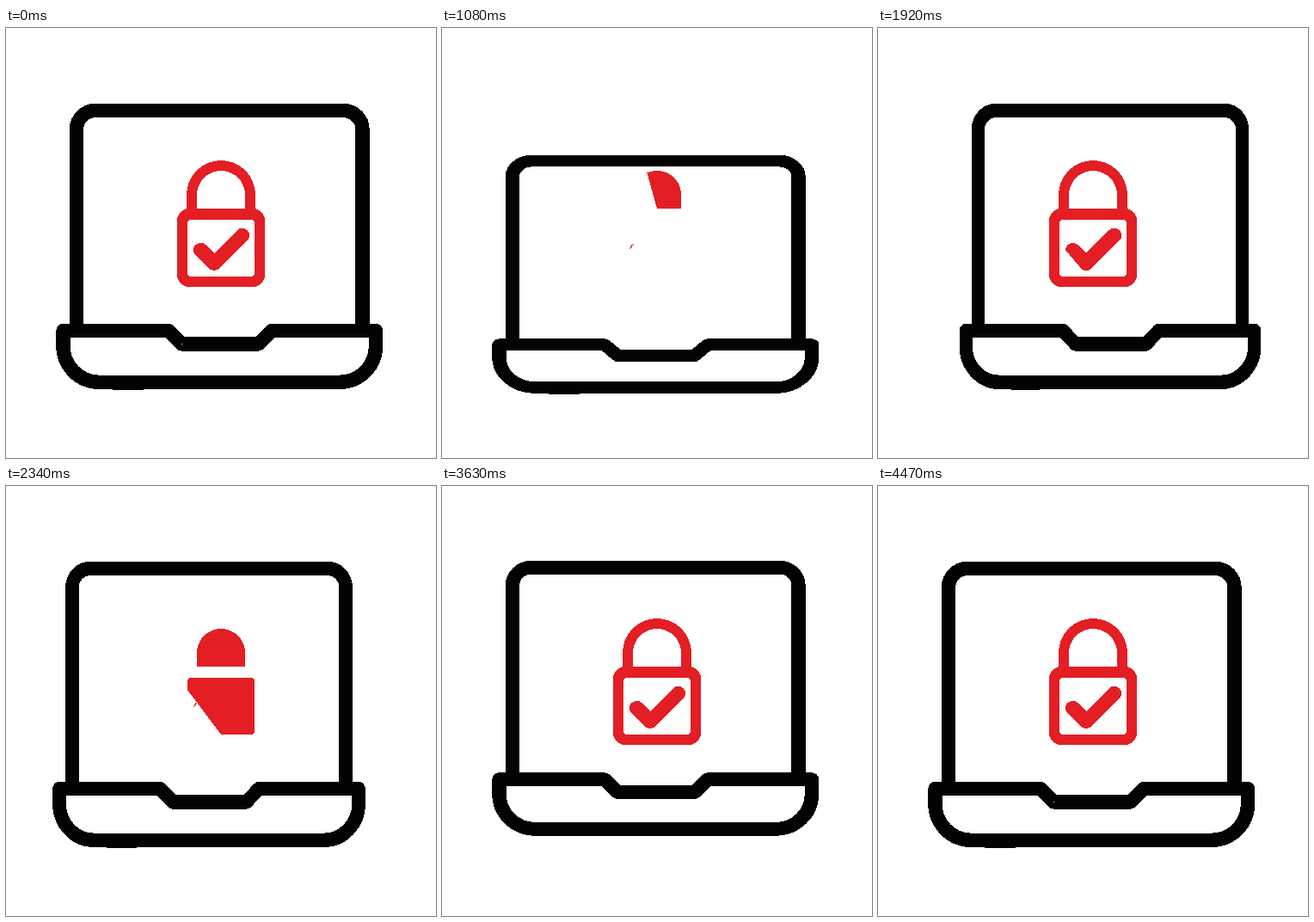
Write an HTML page that moves like this. It is 500x500 px and loops after 5130 ms.

```html
<!DOCTYPE html>
<html lang="en">
<head>
<meta charset="utf-8">
<title>Secure laptop</title>
<style>
  html, body { margin: 0; width: 100%; height: 100%; overflow: hidden; background: #fff; }
  svg { display: block; width: 100%; height: 100%; }
</style>
</head>
<body>
<svg viewBox="0 0 500 500" shape-rendering="crispEdges">
  <g id="laptop" fill="none" stroke="#030303" stroke-width="16.4" stroke-linejoin="round">
    <path d="M82 352V118A22 22 0 0 1 104 96H392.500A22 22 0 0 1 414.500 118V352"/>
    <path d="M66.500 352H189L204.500 367.500H293.500L309 352H430V369.500A42 42 0 0 1 388 411.800H108.500A42 42 0 0 1 66.500 369.500Z"/>
    <path d="M124 412.600H160"/>
  </g>
  <g fill="#e31e24">
    <path id="lock" fill-rule="evenodd"/>
    <path id="check"/>
  </g>
</svg>
<script>
const LOOP = 5130, STEP = 30, SQUASH = 0.167, CHECK_STUB = 10;
const laptop = document.getElementById('laptop');
const lock = document.getElementById('lock');
const check = document.getElementById('check');

function outline(d) {
  const path = document.createElementNS('http://www.w3.org/2000/svg', 'path');
  path.setAttribute('d', d);
  return { d, path, length: path.getTotalLength() };
}

// Padlock outlines in the order in which they are drawn, then the check mark.
const lockOutlines = [
  'M250 210H278V194A28 28 0 0 0 222 194V210Z',
  'M250 289H285A4 4 0 0 0 289 285V227A4 4 0 0 0 285 223H215A4 4 0 0 0 211 227V285A4 4 0 0 0 215 289Z',
  'M250 301H213A14 14 0 0 1 199 287V224A14 14 0 0 1 213 210H287A14 14 0 0 1 301 224V287A14 14 0 0 1 287 301Z',
  'M250 210H210V194A40 40 0 0 1 290 194V210Z'
].map(outline);
const checkOutline = outline('M218 258A8.500 8.500 0 0 1 232 252L242 262L269 235A8.500 8.500 0 0 1 281 247L248 279.500A8.500 8.500 0 0 1 236 279.500L220 264A8.500 8.500 0 0 1 218 258Z');
const total = [...lockOutlines, checkOutline].reduce((sum, o) => sum + o.length, 0);

// Squashes: start, duration, axis, fixed coordinate, wave exponent.
const squashes = [
  [0, 725, 'y', 450, 1],
  [725, 775, 'y', 450, 1],
  [1500, 550, 'x', 533, 2],
  [2247, 550, 'x', -37, 2],
  [2910, 775, 'y', 60, 1],
  [3685, 785, 'y', 60, 1]
];

const clamp = u => Math.min(1, Math.max(0, u));
const progress = (t, from, to) => clamp((t - from) / (to - from));
const smooth = u => u * u * (3 - 2 * u);

function drawn(t) {
  if (t < 742) return 1 - smooth(progress(t, 0, 742));
  if (t < 1934) return progress(t, 742, 1934) ** 2;
  if (t < 2880) return (1 - progress(t, 1934, 2825)) ** 2;
  return smooth(progress(t, 2880, 3630));
}

// A partly drawn outline is closed by a straight chord.
function trim({ d, path, length }, amount) {
  if (amount <= 0) return '';
  if (amount >= length - 0.01) return d;
  const count = Math.ceil(amount);
  const points = [];
  for (let i = 0; i <= count; i++) {
    const p = path.getPointAtLength(amount * i / count);
    points.push(p.x.toFixed(2) + ' ' + p.y.toFixed(2));
  }
  return 'M' + points.join('L') + 'Z';
}

function drawLock(t) {
  let left = drawn(t) * total;
  lock.setAttribute('d', lockOutlines.map(o => {
    const part = trim(o, left);
    left -= o.length;
    return part;
  }).join(''));
  check.setAttribute('d', trim(checkOutline, Math.max(CHECK_STUB, left)));
}

function drawLaptop(t) {
  const active = squashes.find(([start, time]) => t >= start && t < start + time);
  if (!active) return laptop.removeAttribute('transform');
  const [start, time, axis, fixed, power] = active;
  const k = SQUASH * Math.sin(Math.PI * (t - start) / time) ** power;
  laptop.setAttribute('transform', axis === 'x'
    ? `matrix(${1 - k} 0 0 1 ${fixed * k} 0)`
    : `matrix(1 0 0 ${1 - k} 0 ${fixed * k})`);
}

const begin = performance.now();
function frame() {
  const t = Math.floor((performance.now() - begin) % LOOP / STEP) * STEP;
  drawLaptop(t);
  drawLock(t);
  requestAnimationFrame(frame);
}
frame();
</script>
</body>
</html>
```
